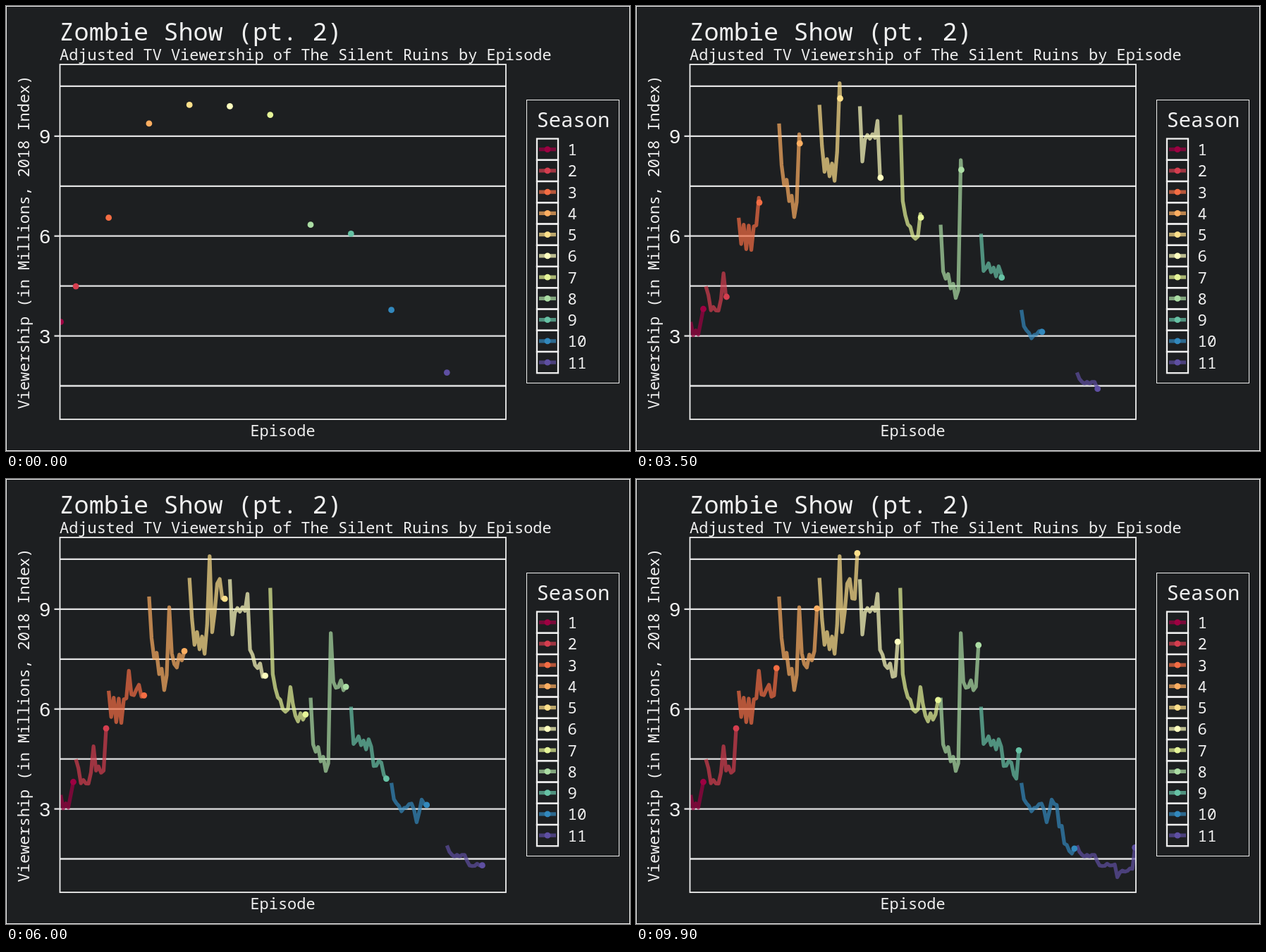
An HTML page with a canvas that plays this animation: 885 px wide and 632 px high, repeating every 10000 ms.

```html
<!DOCTYPE html>
<html lang="en">
<head>
<meta charset="utf-8">
<title>Zombie Show (pt. 2)</title>
<style>
  html, body { margin: 0; width: 100%; height: 100%; overflow: hidden; background: #1d1f21; }
  canvas { display: block; }
</style>
</head>
<body>
<canvas id="stage" width="885" height="632"></canvas>
<script>
const ctx = document.getElementById('stage').getContext('2d');
const MONO = '"Noto Sans Mono", "DejaVu Sans Mono", monospace';
const SANS = '"Liberation Sans", Arial, sans-serif';
const INK = '#f0f0f0', GRID = '#e2e2e3', BACK = '#1d1f21';
const PANEL = { left: 76.5, top: 83, right: 709, bottom: 587 };
const STEP = 3.58, KEY = 30.25;
const FRAMES = 100, FRAME_MS = 100, LONGEST = 24;

const seasons = [];
let aired = 0;

// Straight runs between key episodes, with an early zigzag and a late ripple
function season(color, swing, keys, values) {
  const views = [];
  for (let k = 0; k < keys.length - 1; k++) {
    for (let i = keys[k]; i < keys[k + 1]; i++) {
      const t = (i - keys[k]) / (keys[k + 1] - keys[k]);
      const v = values[k] + (values[k + 1] - values[k]) * t;
      const ripple = i < 8 ? swing * (i % 2) : 0.03 * v * Math.cos(2 * Math.PI * i / 3);
      views.push(t ? v + ripple : v);
    }
  }
  views.push(values[values.length - 1]);
  seasons.push({ color, views, start: aired });
  aired += views.length;
}

// Opening, mid-season break and finale of a regular season
const REGULAR = [0, 1, 2, 6, 7, 8, 9, 11, 14, 15];

season('#9E0142', -0.28, [0, 3, 5], [3.42, 3.04, 3.81]);
season('#D53E4F', 0.1, [0, 2, 5, 6, 7, 8, 11, 12], [4.49, 3.77, 3.76, 4.1, 4.88, 4.15, 4.15, 5.42]);
season('#F46D43', -0.72, REGULAR, [6.55, 5.76, 6.34, 6.29, 6.32, 7.15, 6.44, 6.59, 6.41, 7.23]);
season('#FDAE61', 0.4, REGULAR, [9.38, 8.13, 7.53, 6.57, 7.02, 9.06, 7.67, 7.25, 7.74, 9.02]);
season('#FEE08B', 0.45, REGULAR, [9.94, 8.71, 7.93, 7.66, 8.52, 10.59, 8.31, 9.77, 9.31, 10.68]);
season('#FFFFBF', 0.12, REGULAR, [9.9, 8.24, 8.9, 8.95, 9.46, 7.78, 7.63, 7.23, 7, 8.02]);
season('#E6F598', -0.1, REGULAR, [9.64, 7.05, 6.63, 5.92, 5.99, 6.66, 6.14, 5.63, 5.84, 6.27]);
season('#ABDDA4', 0.28, REGULAR, [6.34, 4.94, 4.72, 4.14, 4.37, 8.28, 6.82, 6.66, 6.67, 7.92]);
season('#66C2A5', 0.2, REGULAR, [6.07, 4.95, 5.04, 4.79, 5.09, 4.87, 4.29, 4.44, 3.91, 4.76]);
season('#3288BD', 0.04, [0, 1, 4, 8, 10, 12, 14, 15, 16, 17, 20, 21],
  [3.78, 3.29, 2.93, 3.16, 2.6, 3.28, 3.12, 2.47, 2.49, 1.96, 1.66, 1.81]);
season('#5E4FA2', -0.05, [0, 2, 7, 9, 15, 16, 17, 22, 23],
  [1.9, 1.62, 1.62, 1.3, 1.33, 0.95, 1.09, 1.2, 1.84]);

const px = n => 77.6 + STEP * n;
const py = v => 610.4 - 47.28 * v;

function line(points, color, width) {
  ctx.beginPath();
  points.forEach(([x, y]) => ctx.lineTo(x, y));
  ctx.strokeStyle = color;
  ctx.lineWidth = width;
  ctx.stroke();
}

function dot(x, y, color) {
  ctx.beginPath();
  ctx.arc(x, y, 4.4, 0, 2 * Math.PI);
  ctx.fillStyle = color;
  ctx.fill();
}

function trail(points, color) {
  ctx.globalAlpha = 0.7;
  line(points, color, 5.3);
  ctx.globalAlpha = 1;
}

function box(x, y, w, h, color, width) {
  ctx.strokeStyle = color;
  ctx.lineWidth = width;
  ctx.strokeRect(x, y, w, h);
}

function text(str, x, y, size, align = 'left', font = MONO) {
  ctx.font = `${size}px ${font}`;
  ctx.textAlign = align;
  ctx.fillStyle = INK;
  ctx.fillText(str, x, y);
}

function drawLabels() {
  text('Zombie Show (pt. 2)', 75.5, 49, 35.2);
  text('Adjusted TV Viewership of The Silent Ruins by Episode', 76, 77, 21.95);
  text('Episode', 392.5, 611, 21.95, 'center');
  ctx.save();
  ctx.translate(33, 335.5);
  ctx.rotate(-Math.PI / 2);
  text('Viewership (in Millions, 2018 Index)', 0, 0, 21.95, 'center');
  ctx.restore();
  for (const v of [3, 6, 9]) {
    text(v, 63, py(v) + 10.5, 28.5, 'right', SANS);
    line([[68.5, py(v)], [76, py(v)]], GRID, 2.3);
  }
}

function drawLegend() {
  box(738.5, 133.5, 131, 402, INK, 1);
  text('Season', 752.5, 172, 28.8);
  seasons.forEach(({ color }, i) => {
    const top = 188.5 + KEY * i, mid = top + KEY / 2;
    box(753, top, 30, KEY, INK, 2.3);
    trail([[756, mid], [780, mid]], color);
    dot(768, mid, color);
    text(i + 1, 796.5, mid + 8.5, 22.3);
  });
}

// Each episode lands on a whole frame; the heads glide between them
function episodeAt(frame) {
  const due = i => Math.round(i * (FRAMES - 1) / (LONGEST - 1));
  let i = 0;
  while (due(i + 1) <= frame) i++;
  return i + (frame - due(i)) / (due(i + 1) - due(i));
}

function drawSeasons(reach) {
  const heads = seasons.map(({ color, views, start }) => {
    const end = Math.min(reach, views.length - 1);
    const whole = Math.floor(end), part = end - whole;
    const points = views.slice(0, whole + 1).map((v, i) => [px(start + i), py(v)]);
    if (part > 0) {
      const v = views[whole] + (views[whole + 1] - views[whole]) * part;
      points.push([px(start + end), py(v)]);
    }
    if (points.length > 1) trail(points, color);
    return [...points[points.length - 1], color];
  });
  heads.forEach(h => dot(...h));
}

function draw(ms) {
  const frame = Math.floor(ms / FRAME_MS) % FRAMES;
  const { left, top, right, bottom } = PANEL;
  ctx.fillStyle = BACK;
  ctx.fillRect(0, 0, 885, 632);
  box(0.5, 0.5, 884, 631, INK, 1);
  for (let v = 1.5; v < 11; v += 1.5) line([[left, py(v)], [right, py(v)]], GRID, 2.3);

  ctx.save();
  ctx.beginPath();
  ctx.rect(left, top, right - left, bottom - top);
  ctx.clip();
  ctx.lineJoin = 'round';
  drawSeasons(episodeAt(frame));
  ctx.restore();

  box(left, top, right - left, bottom - top, INK, 1.8);
  drawLabels();
  drawLegend();
}

let began;
function tick(now) {
  began ??= now;
  draw(now - began);
  requestAnimationFrame(tick);
}
draw(0);
requestAnimationFrame(tick);
</script>
</body>
</html>
```
